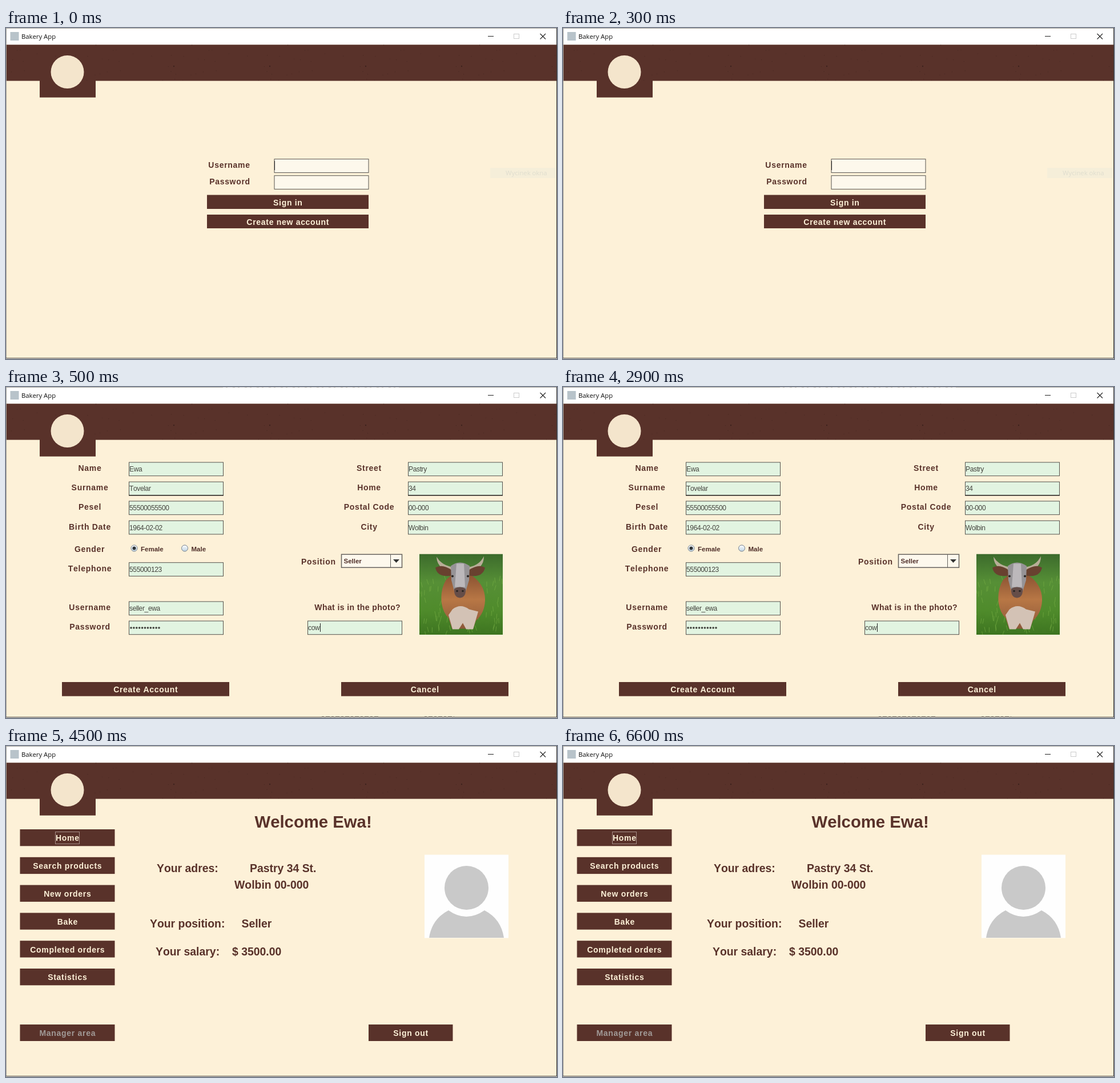
An HTML page for the animation above (8 s loop, 965x580 px).

```html
<!DOCTYPE html>
<html lang="en">
<head>
<meta charset="utf-8">
<title>Bakery App</title>
<style>
  html, body { margin: 0; width: 100%; height: 100%; overflow: hidden; background: #fdf1d8; }
  svg { display: block; width: 965px; height: 580px; }
  text { font-family: "Liberation Sans", Arial, sans-serif; font-kerning: none; white-space: pre; }
  .label { font-size: 14px; font-weight: bold; letter-spacing: .7px; text-anchor: middle; fill: #59322a; }
  .info { font-size: 19.4px; font-weight: bold; fill: #59322a; }
  .value { font-size: 12px; letter-spacing: -.35px; fill: #45443e; }
  .small { font-size: 11.5px; font-weight: bold; fill: #4e2e28; }
  .system { font-family: "Open Sans", sans-serif; font-size: 11.3px; fill: #111; }
</style>
</head>
<body>
<svg id="stage" viewBox="0 0 965 580"></svg>
<script>
const CREAM = '#fdf1d8', BROWN = '#59322a';
const LOOP = 8000;

const rect = (x, y, w, h, fill, extra = '') =>
  `<rect x="${x}" y="${y}" width="${w}" height="${h}" fill="${fill}" ${extra}/>`;
const circle = (x, y, r, fill, extra = '') =>
  `<circle cx="${x}" cy="${y}" r="${r}" fill="${fill}" ${extra}/>`;
const path = (d, fill, extra = '') => `<path d="${d}" fill="${fill}" ${extra}/>`;
const line = (d, color, width = 1, extra = '') =>
  path(d, 'none', `stroke="${color}" stroke-width="${width}" ${extra}`);
const text = (kind, x, y, content, extra = '') =>
  `<text class="${kind}" x="${x}" y="${y}" ${extra}>${content}</text>`;
const label = (x, y, content) => text('label', x, y, content);

const button = (x, y, w, h, content, color = CREAM) =>
  rect(x, y, w, h, BROWN) +
  text('label', x + w / 2 + .3, y + h / 2 + 5.8, content, `style="fill:${color}"`);

const field = (x, y, content = '', fill = '#e2f4e1') =>
  rect(x + .5, y, 165, 23.7, fill, 'stroke="#55534e"') +
  text('value', x + 1, y + 16.2, content);

const radio = (x, content, selected) =>
  circle(x, 282.5, 5.5, 'url(#radioFill)', 'stroke="#75808c"') +
  (selected ? circle(x, 282.5, 3, '#2e3338') : '') +
  text('small', x + 11.5, 288, content);

// Small deterministic generator for header specks and grass.
function random(seed) {
  return () => (seed = seed * 16807 % 2147483647) / 2147483647;
}

function specks() {
  const next = random(41);
  return Array.from({ length: 20 }, () =>
    circle((next() * 168).toFixed(1), (next() * 64).toFixed(1), .6, '#452620')).join('');
}

function windowFrame() {
  return `<defs>
    <linearGradient id="radioFill" x2="0" y2="1">
      <stop stop-color="#fff"/><stop offset="1" stop-color="#bdd2e2"/>
    </linearGradient>
    <linearGradient id="grass" x2="0" y2="1">
      <stop stop-color="#3c6b2c"/><stop offset=".35" stop-color="#568f36"/>
      <stop offset=".7" stop-color="#4f8b2b"/><stop offset="1" stop-color="#3d7420"/>
    </linearGradient>
    <linearGradient id="hide" x2="0" y2="1">
      <stop stop-color="#8c5433"/><stop offset=".45" stop-color="#b87745"/>
      <stop offset="1" stop-color="#8d583a"/>
    </linearGradient>
    <pattern id="specks" y="29" width="168" height="64" patternUnits="userSpaceOnUse">
      ${specks()}${circle(126, 38, 1.2, '#3d211c')}
    </pattern>
  </defs>` +
    rect(0, 0, 965, 580, CREAM) +
    rect(0, 0, 965, 29.3, '#fff') +
    rect(7.5, 7, 15, 15, '#b8c3ca') +
    text('system', 27, 19, 'Bakery App') +
    line('M844 14.5h10', '#222') +
    rect(889.5, 10.5, 9, 8, 'none', 'stroke="#ccc"') +
    line('M935.5 10l9.5 9.5m0-9.5l-9.5 9.5', '#222', 1.1) +
    rect(0, 29.3, 965, 63.3, BROWN) +
    rect(0, 29.3, 965, 63.3, 'url(#specks)') +
    rect(59, 92, 98, 29.7, BROWN) +
    circle(107.5, 77, 29, '#f4e5cc') +
    line('M0 .5H965M.5 0V579', '#a5a29b') +
    line('M964.5 0V579', '#34322f') +
    line('M0 578.5H965', '#45423e') +
    line('M0 579.5H965', '#e8e7e3');
}

function loginScreen() {
  return label(391, 245, 'Username') + label(392, 274, 'Password') +
    field(469.5, 229.7, '', '#fdf8ec') + field(469.5, 258.7, '', '#fdf8ec') +
    line('M470.5 233v16', '#222') +
    button(352, 292.5, 283, 24.5, 'Sign in') +
    button(352, 327, 283, 24, 'Create new account') +
    rect(848, 245, 115, 18, '#f5eed9') +
    text('system', 875, 258, 'Wycinek okna', 'style="fill:#dfddce"');
}

function grassBlades() {
  const next = random(7);
  return Array.from({ length: 90 }, () => {
    const x = next() * 146, y = 45 + next() * 100, lean = next() * 6 - 3;
    return `M${x.toFixed(1)} ${y.toFixed(1)}l${lean.toFixed(1)} -9`;
  }).join('');
}

function cowPhoto() {
  return `<svg x="724" y="292.5" width="146" height="141.5">` +
    rect(0, 0, 146, 142, 'url(#grass)') +
    line(grassBlades(), '#78af45', 1, 'opacity=".6"') +
    path('M47 45Q36 63 39 87Q42 104 51 112L57 131H94L99 117Q114 104 115 82Q116 55 92 38H55Z', 'url(#hide)') +
    path('M58 97Q72 86 87 97L103 101L94 132H82L76 121L69 132H58L51 107Z', '#d3c2b5') +
    path('M57 23Q38 19 30 5Q31 27 57 31M87 23Q105 20 113 4Q113 27 87 31', '#b8ad97') +
    path('M56 28Q40 17 28 24Q31 42 57 38M87 28Q104 17 115 24Q111 42 87 38', '#68412f') +
    path('M55 21Q71 9 88 21L87 46L80 69Q71 82 62 69L56 46Z', '#969396') +
    path('M65 17H78L80 58H62Z', '#bcb8bb') +
    path('M61 61Q71 55 81 61Q82 76 71 77Q60 76 61 61Z', '#654d48') +
    circle(58, 39, 2, '#292523') + circle(85, 39, 2, '#292523') +
    circle(66, 65, 1.8, '#292523') + circle(76, 65, 1.8, '#292523') +
    '</svg>';
}

function accountScreen() {
  const left = [
    [132, 'Name', 'Ewa'], [166.2, 'Surname', 'Tovelar'],
    [200, 'Pesel', '55500055500'], [234.3, 'Birth Date', '1964-02-02'],
    [307.7, 'Telephone', '555000123'], [376, 'Username', 'seller_ewa'],
    [410, 'Password', '']
  ];
  const right = [
    [132, 'Street', 'Pastry'], [166.2, 'Home', '34'],
    [200, 'Postal Code', '00-000'], [234.3, 'City', 'Wolbin']
  ];
  const rows = (items, labelX, fieldX) => items.map(([y, name, value]) =>
    label(labelX, y + 15.2, name) + field(fieldX, y, value)).join('');
  const dots = Array.from({ length: 11 }, (_, i) =>
    circle(219 + i * 4.9, 422, 1.8, '#3d3d38')).join('');

  return rows(left, 147, 215) + rows(right, 636, 704) + dots +
    line('M215 189.7h166M704 189.7h166', '#302d29', 1.6) +
    label(146.5, 289, 'Gender') + radio(224.5, 'Female', true) + radio(313, 'Male', false) +
    label(547.3, 311, 'Position') +
    rect(587.5, 293.3, 106, 23, '#fdf8ed', 'stroke="#65615d" stroke-width="1.5"') +
    line('M673.5 294v22', '#65615d') +
    path('M678 302h11l-5.5 6z', '#333') +
    text('small', 591.5, 309, 'Seller') +
    text('label', 615.7, 391, 'What is in the photo?', 'style="letter-spacing:.4px"') +
    field(528, 410, 'cow') + line('M550.5 414v15', '#222') +
    cowPhoto() +
    button(98, 517, 293, 24.7, 'Create Account') +
    button(587, 517, 293, 24.7, 'Cancel') +
    line('M380 .5H688', '#c4c4c4', 1, 'stroke-dasharray="5 3 9 4"') +
    line('M553 578H655M733 578H785', '#77716a', 1.5, 'stroke-dasharray="4 3 7 3"');
}

function homeScreen() {
  const menu = ['Home', 'Search products', 'New orders', 'Bake', 'Completed orders', 'Statistics'];
  return menu.map((name, i) => button(24.5, 146 + i * 48.8, 166, 29.3, name)).join('') +
    rect(86.5, 150.5, 42, 21, 'none', 'stroke="#a58d86"') +
    button(24.5, 488, 166, 29, 'Manager area', '#a19a97') +
    button(635, 488, 147.5, 29, 'Sign out') +
    text('info', 435.5, 142.5, 'Welcome Ewa!', 'style="font-size:29.3px"') +
    text('info', 264, 220.5, 'Your adres:') + text('info', 427, 220.5, 'Pastry 34 St.') +
    text('info', 400, 249.5, 'Wolbin 00-000') +
    text('info', 252, 318, 'Your position:') + text('info', 412.5, 318, 'Seller') +
    text('info', 262, 366.5, 'Your salary:') + text('info', 396, 366.5, '$ 3500.00') +
    rect(733, 190.5, 147, 146, '#fefefe') +
    circle(806.5, 248.5, 38.5, '#c9c9c9') +
    path('M741 336Q746 303 775 288Q806 310 838 288Q867 303 872 336Z', '#c9c9c9');
}

const screens = [
  { start: 0, draw: loginScreen },
  { start: 500, draw: accountScreen },
  { start: 4500, draw: homeScreen }
];

const stage = document.getElementById('stage');
stage.innerHTML = windowFrame() +
  screens.map(({ draw }) => `<g class="screen">${draw()}</g>`).join('');
const groups = stage.querySelectorAll('.screen');

const origin = performance.now();
function render(now) {
  const time = Math.max(0, now - origin) % LOOP;
  const current = screens.filter(({ start }) => time >= start).length - 1;
  groups.forEach((group, i) => group.style.display = i === current ? '' : 'none');
  requestAnimationFrame(render);
}
render(origin);
</script>
</body>
</html>
```
